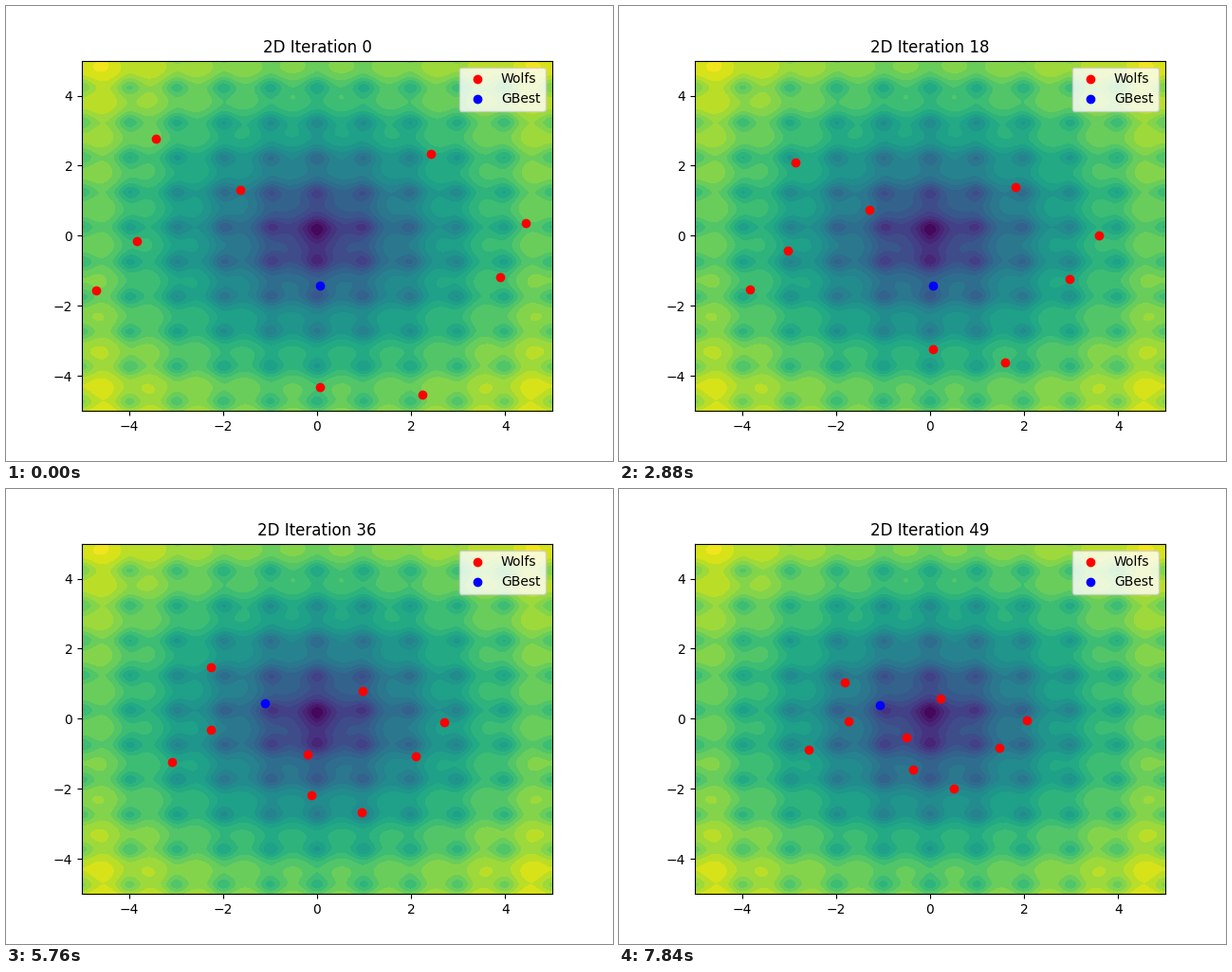
A matplotlib script for the animation above (8 s loop, 640 by 480 pixels).

```python
import numpy as np
import matplotlib.pyplot as plt
from matplotlib.animation import FuncAnimation

FRAMES, INTERVAL = 50, 160

# Each wolf: start x, start y, step length per iteration
PACK = np.array([
    (-3.43, 2.77, 0.0485),
    (-1.64, 1.30, 0.0372),
    (-3.83, -0.15, 0.0473),
    (-4.70, -1.56, 0.0480),
    (2.42, 2.34, 0.0625),
    (4.44, 0.36, 0.0510),
    (3.89, -1.18, 0.0513),
    (0.06, -4.32, 0.0600),
    (2.24, -4.53, 0.0627),
    (0.06, -1.42, 0.0530),
])


def cost(x, y):
    bowl = -20 * np.exp(-0.2 * np.sqrt(0.5 * (x**2 + y**2)))
    waves = np.exp(0.5 * (np.cos(2 * np.pi * x) + np.sin(2 * np.pi * y)))
    return bowl - waves + 20 + np.e


def leader(pts):
    return np.argmin(cost(pts[:, 0], pts[:, 1]))


def hunt():
    """Every wolf steps towards the current best one, which stands still."""
    pts, speed = PACK[:, :2], PACK[:, 2:]
    trail = [pts]
    for _ in range(FRAMES - 1):
        gap = pts[leader(pts)] - pts
        dist = np.linalg.norm(gap, axis=1, keepdims=True)
        pts = pts + gap * np.minimum(1, speed / np.maximum(dist, 1e-9))
        trail.append(pts)
    return trail


trail = hunt()

fig, ax = plt.subplots(figsize=(6.4, 4.8), dpi=100)
axis = np.linspace(-5, 5, 251)
X, Y = np.meshgrid(axis, axis)
ax.contourf(X, Y, cost(X, Y), levels=25, cmap="viridis")
ax.set_xlim(-5, 5)
ax.set_ylim(-5, 5)

wolves = ax.scatter([0], [0], color="red", label="Wolfs", zorder=2)
best = ax.scatter([0], [0], color="blue", label="GBest", zorder=3)
title = ax.set_title("2D Iteration 0")
ax.legend(loc="upper right")


def update(i):
    pts = trail[i]
    lead = leader(pts)
    wolves.set_offsets(np.delete(pts, lead, axis=0))
    best.set_offsets(pts[lead:lead + 1])
    title.set_text(f"2D Iteration {i}")
    return wolves, best, title


anim = FuncAnimation(fig, update, frames=FRAMES, interval=INTERVAL,
                     init_func=lambda: update(0), repeat=True, repeat_delay=0)
plt.show()
```
